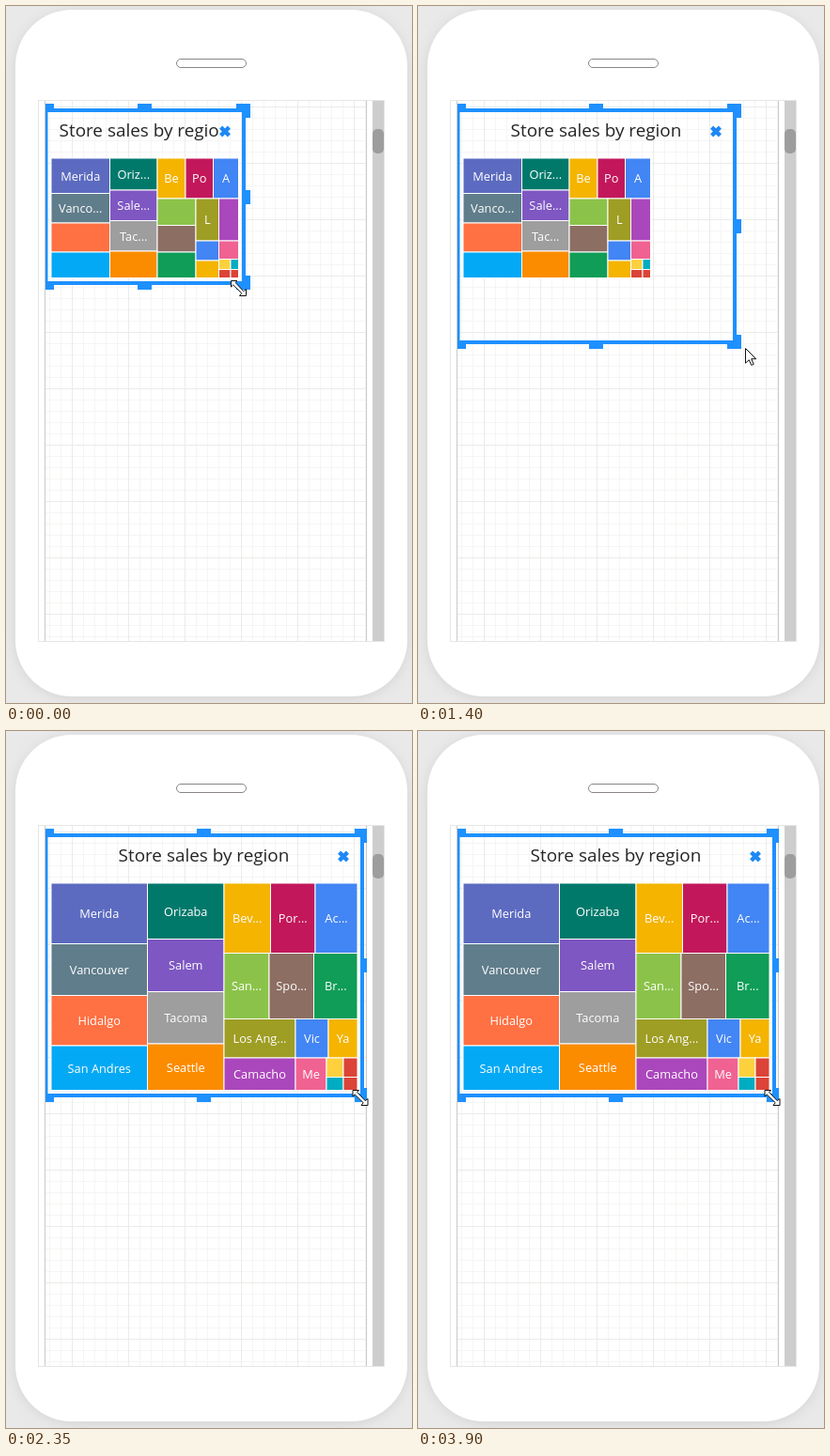
These frames come from a looping animation (432 px wide and 742 px high, 3.95 s). An HTML page:

```html
<!DOCTYPE html>
<html lang="en">
<head>
<meta charset="utf-8">
<title>Resizing a widget</title>
<style>
html, body { margin: 0; width: 100%; height: 100%; overflow: hidden; background: #e9e9e9; }
svg { display: block; width: 432px; height: 742px; }
text { font-family: "Open Sans", "Noto Sans", sans-serif; text-anchor: middle; }
.map text { font-size: 12.8px; fill: #fff; }
.map rect { stroke: #fff; stroke-width: 1; }
</style>
</head>
<body>
<svg viewBox="0 0 432 742">
  <defs>
    <filter id="soft" x="-10%" y="-10%" width="120%" height="120%"><feGaussianBlur stdDeviation="7"/></filter>
    <pattern id="minor" width="12" height="12" x="10" y="11" patternUnits="userSpaceOnUse">
      <path d="M.5 0V12M0 .5H12" stroke="#f5f5f4"/>
    </pattern>
    <pattern id="major" width="60" height="60" x="10" y="47" patternUnits="userSpaceOnUse">
      <path d="M.5 0V60M0 .5H60" stroke="#ebebea"/>
    </pattern>
    <clipPath id="panel"><rect x="42" y="101" width="342" height="575"/></clipPath>
    <clipPath id="titleClip"><rect id="titleBox" x="44" y="113" width="184" height="40"/></clipPath>
  </defs>
  <rect width="432" height="742" fill="#e9e9e9"/>
  <rect x="10" y="6" width="417" height="731" rx="62" fill="#d2d2d2" filter="url(#soft)"/>
  <rect x="10" y="4" width="417" height="731" rx="60" fill="#fff"/>
  <rect x="181.5" y="56.5" width="74" height="9" rx="4.5" fill="#fff" stroke="#8a8486"/>
  <rect x="34.5" y="100.5" width="368" height="576" fill="#fff" stroke="#e6e6e6"/>
  <rect x="42" y="101" width="341" height="575" fill="url(#minor)"/>
  <rect x="42" y="101" width="341" height="575" fill="url(#major)"/>
  <path d="M41.5 101V676M383.5 101V676" stroke="#c9c9c9"/>
  <rect x="390" y="101" width="12" height="575" fill="#cdcdcd"/>
  <rect x="390" y="131" width="12" height="26" rx="5" fill="#9d9d9d"/>
  <g clip-path="url(#panel)">
    <path id="frame" fill="#1e90ff"/>
    <g clip-path="url(#titleClip)"><text id="title" y="139" font-size="18.9" fill="#252525">Store sales by region</text></g>
    <path id="close" d="M-4.4-4.4L4.4 4.4M4.4-4.4L-4.4 4.4" stroke="#1e88f5" stroke-width="4.4"/>
  </g>
  <g id="small" class="map"></g>
  <g id="large" class="map"></g>
  <path id="resize" d="M-8-8H-1.5L-3.4-6.1L5.2 3.1L8 1V8H1L3.2 5.2L-5.8-3.6L-8-1.5Z" fill="#fff" stroke="#111" stroke-linejoin="round"/>
  <path id="arrow" d="M.5.5V16.2L4.2 12.7L6.8 18.4L9.2 17.3L6.7 11.7H11.7Z" fill="#fff" stroke="#111"/>
</svg>
<script>
const LOOP = 3950, STEP = 50, REDRAW = 2200;
const $ = id => document.getElementById(id);

const color = {
  indigo: '#5c6bc0', slate: '#607d8b', coral: '#ff7043', sky: '#03a9f4',
  green: '#00796b', violet: '#7e57c2', gray: '#9e9e9e', orange: '#fb8c00',
  gold: '#f4b400', pink: '#c2185b', blue: '#4285f4', lime: '#8bc34a',
  brown: '#8d6e63', leaf: '#0f9d58', olive: '#9e9d24', purple: '#ab47bc',
  rose: '#f06292', yellow: '#fdd13d', teal: '#00acc1', red: '#db4437'
};

function cell(x, y, x2, y2, fill, label) {
  const box = `<rect x="${x}" y="${y}" width="${x2 - x}" height="${y2 - y}" fill="${color[fill]}"/>`;
  return box + (label ? `<text x="${(x + x2) / 2}" y="${(y + y2) / 2 + 4.8}">${label}</text>` : '');
}

// Cells stacked down or laid along; items are "color:label"
const column = (x, x2, ys, items) => items.split('|').map((item, i) =>
  cell(x, ys[i], x2, ys[i + 1], ...item.split(':'))).join('');
const row = (y, y2, xs, items) => items.split('|').map((item, i) =>
  cell(xs[i], y, xs[i + 1], y2, ...item.split(':'))).join('');

$('small').innerHTML =
  column(48, 110.5, [162, 199.5, 231, 262, 289.5], 'indigo:Merida|slate:Vanco...|coral|sky') +
  column(110.5, 161, [162, 196, 228.5, 261, 289.5], 'green:Oriz...|violet:Sale...|gray:Tac...|orange') +
  row(162, 205, [161, 191, 220.5, 247.5], 'gold:Be|pink:Po|blue:A') +
  column(161, 202, [205, 233.5, 262, 289.5], 'lime|brown|leaf') +
  column(202, 226.5, [205, 250, 271, 289.5], 'olive:L|blue|gold') +
  column(226.5, 247.5, [205, 250, 269.5], 'purple|rose') +
  row(269.5, 280.5, [226.5, 239, 247.5], 'yellow|teal') +
  row(280.5, 289.5, [226.5, 239, 247.5], 'red|red');

$('large').innerHTML =
  column(48, 150.5, [162, 226.5, 281.5, 335, 382.5], 'indigo:Merida|slate:Vancouver|coral:Hidalgo|sky:San Andres') +
  column(150.5, 232, [162, 221.5, 277.5, 333, 382.5], 'green:Orizaba|violet:Salem|gray:Tacoma|orange:Seattle') +
  row(162, 236.5, [232, 281.5, 329, 374], 'gold:Bev...|pink:Por...|blue:Ac...') +
  row(236.5, 306.5, [232, 280, 327.5, 374], 'lime:San...|brown:Spo...|leaf:Br...') +
  row(306.5, 348, [232, 308, 343, 374], 'olive:Los Ang...|blue:Vic|gold:Ya') +
  row(348, 382.5, [232, 308, 341], 'purple:Camacho|rose:Me') +
  row(348, 368.5, [341, 359, 374], 'yellow|red') +
  row(368.5, 382.5, [341, 359, 374], 'teal|red');

// Keys are [time, x, y]
const corner = [[0, 255, 296.5], [100, 256, 296], [850, 256, 296], [1100, 291, 331], [1400, 339, 360], [1700, 379, 383], [1800, 381, 389.5]];
const mouse = [[0, 247.5, 300.5], [200, 254.5, 300.5], [850, 254.5, 300.5], [1100, 311, 345], [1400, 348, 364], [1650, 372, 373], [1700, 377, 388.5], [1800, 377, 390.5]];

function at(keys, t) {
  const i = keys.findIndex(k => k[0] > t);
  if (i < 0) return keys[keys.length - 1].slice(1);
  const a = keys[i - 1], b = keys[i], p = (t - a[0]) / (b[0] - a[0]);
  return [a[1] + (b[1] - a[1]) * p, a[2] + (b[2] - a[2]) * p];
}

const rect = (x, y, w, h) => `M${x} ${y}h${w}v${h}h${-w}z`;
const place = (el, x, y) => el.setAttribute('transform', `translate(${x} ${y})`);
const show = (el, on) => el.setAttribute('visibility', on ? 'visible' : 'hidden');

function framePath(r, b) {
  const mx = Math.round((42 + r) / 2 - 8.5), my = Math.round((109 + b) / 2 - 7.5);
  return [
    rect(42, 109, 2.5, b - 109), rect(42, 109, r - 42, 4),
    rect(r - 4, 109, 4, b - 109), rect(42, b - 4, r - 42, 4),
    ...[42, mx, r - 10].flatMap((x, i) => [rect(x, 104, i ? 15 : 9, 8), rect(x, b - 3, i ? 15 : 9, 8)]),
    ...[104, my, b - 10].map(y => rect(r - 3, y, 8, 15))
  ].join('');
}

function draw(t) {
  const [r, b] = at(corner, t).map(Math.round), [x, y] = at(mouse, t);
  $('frame').setAttribute('d', framePath(r, b));
  $('title').setAttribute('x', (40 + r) / 2);
  $('titleBox').setAttribute('width', r - 71);
  place($('close'), r - 22, 133.5);
  const pointing = t >= 900 && t < 1700;
  show($('arrow'), pointing);
  show($('resize'), !pointing);
  place($('arrow'), Math.round(x), Math.round(y));
  place($('resize'), x, y);
  show($('small'), t < REDRAW);
  show($('large'), t >= REDRAW);
}

const start = performance.now();
function tick() {
  const t = (performance.now() - start) % LOOP;
  draw(Math.floor(t / STEP) * STEP);
  requestAnimationFrame(tick);
}
tick();
</script>
</body>
</html>
```
